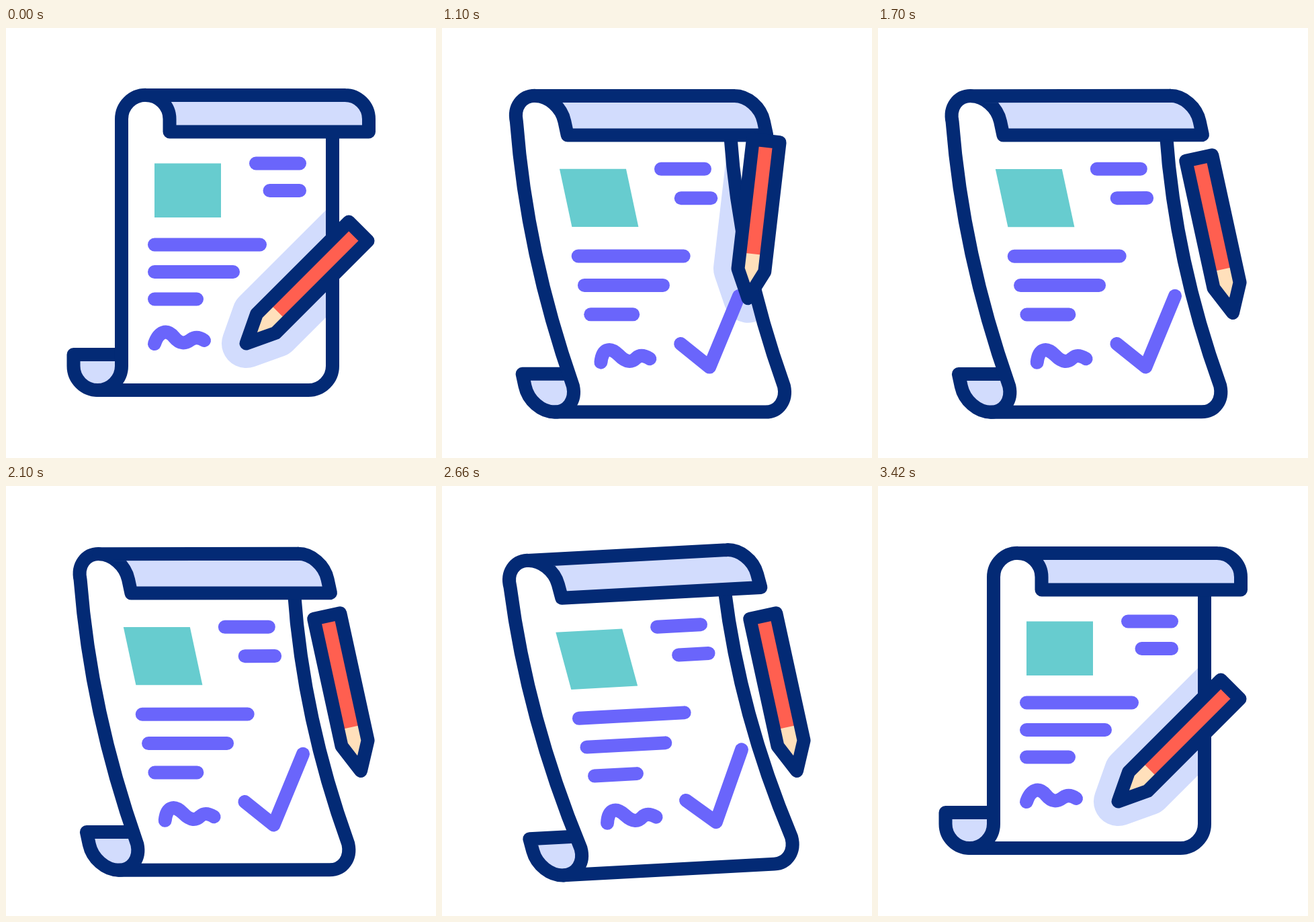
An HTML page with a canvas that plays this animation: 640 by 640 pixels, repeating every 3600 ms.

```html
<!DOCTYPE html>
<html lang="en">
<head>
<meta charset="utf-8">
<title>Signing a document</title>
<style>
  html, body { margin: 0; width: 100%; height: 100%; overflow: hidden; background: #fff; }
  canvas { display: block; }
</style>
</head>
<body>
<canvas id="stage" width="640" height="640"></canvas>
<script>
const ctx = document.getElementById('stage').getContext('2d');
const LOOP = 3600, RETURN = 3000, END = 3410;
const NAVY = '#032a75', LIGHT = '#d2dcfd', VIOLET = '#6a65fb',
      TEAL = '#67cccf', RED = '#ff5f50', WOOD = '#ffe0bb';

// Same curve as cubic-bezier(.42, 0, .58, 1)
function ease(x) {
  let lo = 0, hi = 1;
  for (let i = 0; i < 24; i++) {
    const s = (lo + hi) / 2;
    if (s * (1.26 + s * (-0.78 + s * 0.52)) < x) lo = s; else hi = s;
  }
  return lo * lo * (3 - 2 * lo);
}

const mix = (a, b, k) => a + (b - a) * k;

// Keys are [time, ...values]; returns the eased values at time t
function track(keys, t) {
  const next = keys.findIndex(key => key[0] > t);
  if (next < 0) return keys[keys.length - 1].slice(1);
  const a = keys[Math.max(next - 1, 0)], b = keys[next];
  const k = ease(Math.max(0, (t - a[0]) / (b[0] - a[0])));
  return a.slice(1).map((v, i) => mix(v, b[i + 1], k));
}

const bendKeys = [[0, 0], [400, 1], [RETURN, 1], [END, 0]];
const checkKeys = [[400, 0], [600, 1], [1000, 2], [RETURN, 2], [END, 0]];
const pencilKeys = [ // tip x, tip y, lean in degrees
  [0, 357.5, 469.5, 45], [400, 353.5, 470, 10.2], [600, 395, 504.5, 10.2],
  [1000, 444.5, 399, 9.5], [1400, 528, 424, -12.3],
  [RETURN, 528, 424, -12.3], [END, 357.5, 469.5, 45]
];
const wobbleKeys = [[1400, 0]];
for (let i = 0; i < 7; i++) wobbleKeys.push([1600 + i * 200, i % 2 ? -5 : 5]);
wobbleKeys.push([RETURN, 0]);

const pencilShape = new Path2D('M0 0L-20 -42V-236H20V-42Z');
const woodShape = new Path2D('M0 0L-20 -42V-66.5H20V-42Z');

function drawPencil([x, y, lean], paint) {
  ctx.save();
  ctx.translate(x, y);
  ctx.rotate(lean * Math.PI / 180);
  paint();
  ctx.restore();
}

function outline(shape, color, width) {
  ctx.strokeStyle = color;
  ctx.lineWidth = width;
  if (shape) ctx.stroke(shape); else ctx.stroke();
}

function draw(t) {
  const [bend] = track(bendKeys, t);
  const [wobble] = track(wobbleKeys, t);
  const [check] = track(checkKeys, t);
  const pencil = track(pencilKeys, t);

  // Builds a path on the sheared sheet; strokes keep their own width
  function sheet(build) {
    const shear = 0.229 * bend, stretch = 1 + 0.072 * bend;
    ctx.beginPath();
    ctx.save();
    ctx.translate(320, 320);
    ctx.rotate(wobble * Math.PI / 180);
    ctx.translate(-320, -320);
    ctx.transform(1, 0, shear, stretch, -shear * 402.5, -6.2 * bend);
    build();
    ctx.restore();
  }
  function line(...points) {
    sheet(() => points.forEach(p => ctx.lineTo(...p)));
    outline(null, VIOLET, 20);
  }
  const bow = 27 * bend;

  ctx.fillStyle = '#fff';
  ctx.fillRect(0, 0, 640, 640);
  ctx.lineCap = ctx.lineJoin = 'round';

  // Pencil glow, only on the sheet
  ctx.save();
  sheet(() => {
    ctx.moveTo(172, 140);
    ctx.lineTo(486, 154.5);
    ctx.quadraticCurveTo(486 - bow, 329, 486, 503);
    ctx.arc(450, 503, 36, 0, Math.PI / 2);
    ctx.lineTo(136, 539);
    ctx.arc(136, 503, 36, Math.PI / 2, 0, true);
    ctx.quadraticCurveTo(172 - bow, 319, 172, 135);
  });
  ctx.clip();
  drawPencil(pencil, () => {
    ctx.fillStyle = LIGHT;
    ctx.fill(pencilShape);
    outline(pencilShape, LIGHT, 73);
  });
  ctx.restore();

  // Contents
  sheet(() => ctx.rect(221, 201.5, 99, 80.5));
  ctx.fillStyle = TEAL;
  ctx.fill();
  line([372, 201.5], [437, 201.5]);
  line([392.5, 242], [437, 242]);
  line([221, 322.5], [378, 322.5]);
  line([221, 363], [338, 363]);
  line([221, 403.5], [284, 403.5]);
  sheet(() => {
    ctx.moveTo(221, 470);
    ctx.bezierCurveTo(227, 452, 239, 447, 250, 460);
    ctx.bezierCurveTo(259, 471, 267, 470, 275, 464);
    ctx.bezierCurveTo(282, 459, 289, 461, 295, 465);
  });
  outline(null, VIOLET, 20);

  if (check > 0) {
    const down = Math.min(check, 1), up = Math.max(check - 1, 0);
    const mark = [[345.6, 444.2], [mix(345.6, 381.2, down), mix(444.2, 476.5, down)]];
    if (up > 0) mark.push([mix(381.2, 447.5, up), mix(476.5, 378, up)]);
    line(...mark);
  }

  // Lower curl
  sheet(() => {
    ctx.moveTo(172, 486);
    ctx.lineTo(100.5, 486);
    ctx.lineTo(100.5, 503);
    ctx.arc(136.5, 503, 36, Math.PI, Math.PI / 2, true);
    ctx.arc(136, 503, 36, Math.PI / 2, 0, true);
  });
  ctx.fillStyle = LIGHT;
  ctx.fill();
  sheet(() => {
    ctx.moveTo(162, 486);
    ctx.lineTo(100.5, 486);
    ctx.lineTo(100.5, 503);
    ctx.arc(136.5, 503, 36, Math.PI, Math.PI / 2, true);
    ctx.lineTo(450, 539);
    ctx.arc(450, 503, 36, Math.PI / 2, 0, true);
    ctx.quadraticCurveTo(486 - bow, 329, 486, 154.5);
  });
  outline(null, NAVY, 20);

  // Left side and upper roll
  sheet(() => {
    ctx.moveTo(136, 539);
    ctx.arc(136, 503, 36, Math.PI / 2, 0, true);
    ctx.quadraticCurveTo(172 - bow, 319, 172, 135.5);
    ctx.arc(207.75, 135.5, 35.75, Math.PI, Math.PI * 1.5);
  });
  outline(null, NAVY, 20);
  sheet(() => {
    ctx.moveTo(208, 100);
    ctx.lineTo(505, 100);
    ctx.arc(504.5, 135.5, 35.5, -Math.PI / 2, 0);
    ctx.lineTo(540, 154.5);
    ctx.lineTo(243.5, 154.5);
    ctx.arc(208, 135.5, 35.5, 0, -Math.PI / 2, true);
    ctx.closePath();
  });
  ctx.fillStyle = LIGHT;
  ctx.fill();
  outline(null, NAVY, 20);

  drawPencil(pencil, () => {
    ctx.fillStyle = RED;
    ctx.fill(pencilShape);
    ctx.fillStyle = WOOD;
    ctx.fill(woodShape);
    outline(pencilShape, NAVY, 20);
  });
}

function frame() {
  draw(performance.now() % LOOP);
  requestAnimationFrame(frame);
}
frame();
</script>
</body>
</html>
```
